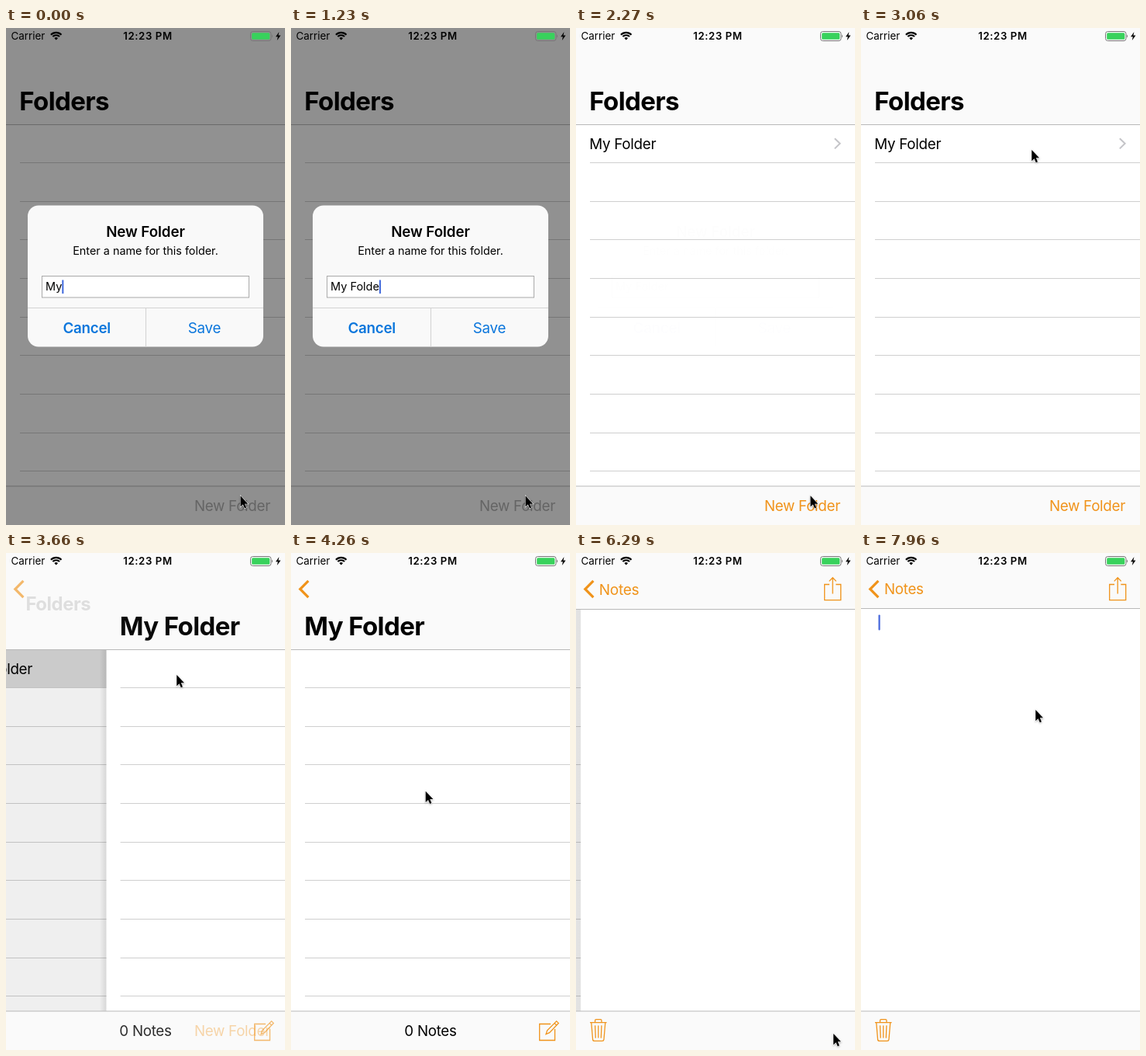
Recreate the animation shown at these times as an HTML page. Size 360 by 640 pixels, loop 7.99 s.

```html
<!DOCTYPE html>
<html lang="en">
<head>
<meta charset="utf-8">
<title>Folders</title>
<style>
html, body { margin: 0; width: 100%; height: 100%; overflow: hidden; background: #fff; }
svg { display: block; width: 360px; height: 640px; font-family: Inter, "Liberation Sans", sans-serif; }
text { white-space: pre; }
.body { font-size: 18.8px; letter-spacing: -.3px; }
.large { font-size: 33px; font-weight: 700; letter-spacing: -.6px; }
.semi { font-weight: 600; }
.mid { text-anchor: middle; }
.tint { fill: #f0931a; }
.icon { fill: none; stroke: #f0931a; stroke-width: 1.3; }
.hair { stroke: #b9b9b9; }
</style>
</head>
<body>
<svg viewBox="0 0 360 640">
  <defs>
    <linearGradient id="shade">
      <stop offset="0" stop-color="#000" stop-opacity="0"/>
      <stop offset="1" stop-color="#000" stop-opacity=".28"/>
    </linearGradient>
    <path id="lines" fill="none" stroke="#cfcfcf"/>
    <rect id="edge" x="-9" width="9" height="640" fill="url(#shade)"/>
  </defs>

  <rect width="360" height="640" fill="#fff"/>
  <g id="folders">
    <g id="row">
      <rect id="press" y="124" width="360" height="50" fill="#d9d9d9"/>
      <text class="body" x="17.3" y="156">My Folder</text>
      <path d="M333.8 142.2L340.6 148.8L333.8 155.4" fill="none" stroke="#c4c4c8" stroke-width="2"/>
    </g>
    <use href="#lines"/>
  </g>
  <rect id="shade1" width="360" height="640"/>
  <g id="notes">
    <use id="edge1" href="#edge"/>
    <rect width="360" height="640" fill="#fff"/>
    <use href="#lines"/>
  </g>
  <rect id="shade2" width="360" height="640"/>
  <g id="note">
    <use id="edge2" href="#edge"/>
    <rect width="360" height="640" fill="#fff"/>
    <rect id="noteCaret" x="22.5" y="79.5" width="2.2" height="20" rx="1" fill="#4566dc"/>
  </g>

  <rect id="nav" width="360" fill="#fafafa"/>
  <path id="navLine" class="hair" d="M0 0H360"/>
  <rect y="590" width="360" height="50" fill="#fafafa"/>
  <path class="hair" d="M0 590H360"/>

  <text id="title1" class="large">Folders</text>
  <text id="title2" class="large">My Folder</text>
  <path id="back" class="icon" style="stroke-width:3.2" d="M22.4 35.8L11.8 46.5L22.4 57.2"/>
  <text id="backLabel" class="body tint">Notes</text>
  <path id="share" class="icon" d="M327 40.5H320.7V60.7H341.7V40.5H335.3M331.2 52.5V32M326.7 36.4L331.2 31.8L335.7 36.4"/>

  <text id="add" class="body" x="341" y="622" text-anchor="end">New Folder</text>
  <text id="count" class="body mid" x="180" y="622">0 Notes</text>
  <path id="compose" class="icon" d="M335 606.5H320.7V627.5H340.5V613M329 619.6L330.6 614.8L342.6 602.8L345.2 605.4L333.6 617.6ZM340 605.4L342.8 608.2"/>
  <path id="trash" class="icon" d="M18 604.6H39.6M24.6 604.4V602Q24.6 600.6 26 600.6H31.6Q33 600.6 33 602V604.4M19.8 604.8L21.6 626.4Q21.8 628.4 23.8 628.4H33.8Q35.8 628.4 36 626.4L37.8 604.8M24.6 608.4L25.3 624.6M28.8 608.4V624.6M33 608.4L32.3 624.6"/>

  <rect id="dim" width="360" height="640"/>
  <g id="alert">
    <rect x="28" y="228.5" width="304" height="182" rx="14" fill="#f9f9f9"/>
    <text class="body semi mid" x="180" y="269" style="letter-spacing:-.1px">New Folder</text>
    <text class="mid" x="180" y="291.5" font-size="14.4">Enter a name for this folder.</text>
    <rect id="field" x="46.5" y="319.5" width="267" height="27.5" fill="#fff"/>
    <text id="typed" x="51" y="338.3" font-size="14.5"></text>
    <rect id="caret" y="324.5" width="2" height="17.5" fill="#3f68dc"/>
    <path d="M28 360.5H332M180.5 361V410.5" stroke="#d2d2d2"/>
    <text class="body semi mid" x="104.2" y="392.8" fill="#0b76dc">Cancel</text>
    <text class="body mid" x="256" y="392.8" fill="#0b76dc">Save</text>
  </g>

  <g id="status">
    <text x="6.5" y="15.3" font-size="13.4">Carrier</text>
    <path d="M57.9 8.7A9.6 9.6 0 0 1 71.5 8.7M60.3 11.1A6.2 6.2 0 0 1 69.1 11.1" fill="none" stroke="#000" stroke-width="2.1"/>
    <path d="M62.3 13.1A3.4 3.4 0 0 1 67.1 13.1L64.7 15.6Z"/>
    <text class="semi mid" x="183" y="15.3" font-size="13.2" letter-spacing=".6">12:23 PM</text>
    <rect x="315.5" y="4.5" width="26.5" height="12" rx="3" fill="none" stroke="#777"/>
    <rect x="317.2" y="6.2" width="23.1" height="8.6" rx="1.6" fill="#38d25c"/>
    <path d="M343 8.5Q345 10.5 343 12.5Z" fill="#777"/>
    <path d="M352.4 5L348 11.2H350.8L349.8 16L354.4 9.6H351.4Z"/>
  </g>
  <path id="cursor" d="M0 0V16.4L3.8 12.9L6.3 18.6L8.8 17.5L6.4 11.9H11.2Z" stroke="#fff" stroke-width="1.2" paint-order="stroke" style="filter:drop-shadow(0 1px 1px rgba(0,0,0,.3))"/>
</svg>

<script>
const LOOP = 7990;
const ui = {};
document.querySelectorAll('[id]').forEach(n => ui[n.id] = n);

const clamp = v => Math.max(0, Math.min(1, v));
const mix = (a, b, p) => a + (b - a) * p;
const set = (n, name, v) => n.setAttribute(name, v);
const fade = (n, v) => set(n, 'opacity', clamp(v));
const place = (n, x, y = 0, s = 1) => set(n, 'transform', `translate(${x} ${y}) scale(${s})`);

// critically damped spring used by every transition
const spring = (t, start) => {
  const k = Math.max(0, t - start) * 0.018;
  return k > 9 ? 1 : 1 - (1 + k) * Math.exp(-k);
};

const DISMISS = 1814, ROW = 2250, TAP = 3460, OPEN = 3540;
const COMPOSE = 5890, WRITE = 5957, FOCUS = 7430;
const NAME = 'My Folder';
const KEYS = [200, 600, 760, 920, 1080, 1220, 1380];
const PATH = [
  [2450, 302.5, 602.3], [2900, 222, 160], [3060, 220.3, 157],
  [3920, 220.3, 157], [4160, 157, 268], [4235, 157, 268],
  [4260, 173.7, 306.7], [4480, 272, 520], [4750, 321, 614],
  [5030, 321, 614], [5300, 320, 607], [5610, 332.2, 619],
  [6400, 332.2, 619], [6660, 300, 288], [7050, 228, 206], [7300, 225.3, 202]
];

set(ui.lines, 'd', Array.from({ length: 9 }, (_, i) =>
  `M18 ${173.5 + Math.round(i * 49.65)}H360`).join(''));

function pointer(t) {
  const i = PATH.findIndex(k => k[0] > t);
  if (i === 0) return PATH[0].slice(1);
  if (i < 0) return PATH[PATH.length - 1].slice(1);
  const [t0, x0, y0] = PATH[i - 1], [t1, x1, y1] = PATH[i];
  const u = (t - t0) / (t1 - t0), e = u * u * (3 - 2 * u);
  return [mix(x0, x1, e), mix(y0, y1, e)];
}

// a large title shrinking into the back button
function shrink(n, p) {
  place(n, mix(17.2, 30, p), mix(106, 53, Math.pow(p, 1.1)), mix(1, 0.57, p));
  fade(n, 1 - p * 1.4);
}

// a pushed panel casts its shadow only while it is moving
const castShadow = (n, p) => fade(n, p > 0 ? 1 - p : 0);

function drawAlert(t) {
  const left = 1 - spring(t, DISMISS), closing = t >= DISMISS;
  for (const part of ui.alert.children) fade(part, left);
  fade(ui.dim, left * 0.43);
  ui.typed.textContent = NAME.slice(0, 2 + KEYS.filter(k => t >= k).length);
  set(ui.caret, 'x', 51 + ui.typed.getComputedTextLength());
  fade(ui.caret, closing ? 0 : 1);
  set(ui.field, 'stroke', closing ? '#111' : '#a9a9a9');
  set(ui.add, 'fill', closing ? '#f0931a' : '#b0b0b0');
}

function render(t) {
  const p = spring(t, OPEN), q = spring(t, WRITE);
  drawAlert(t);

  fade(ui.row, t >= ROW ? 1 : 0);
  fade(ui.press, t >= TAP ? 1 : 0);
  place(ui.folders, -108 * p);
  fade(ui.shade1, p * 0.1);
  place(ui.notes, 360 * (1 - p) - 108 * q);
  castShadow(ui.edge1, p);
  fade(ui.shade2, q * 0.11);
  place(ui.note, 360 * (1 - q));
  castShadow(ui.edge2, q);
  fade(ui.noteCaret, t >= FOCUS ? 1 : 0);

  const bottom = 124.5 - 53 * Math.pow(q, 1.1);
  set(ui.nav, 'height', bottom);
  place(ui.navLine, 0, bottom);
  shrink(ui.title1, p);
  if (q > 0) shrink(ui.title2, q);
  else {
    place(ui.title2, 17.2 + 360 * (1 - p), 106);
    fade(ui.title2, p * 1.5);
  }
  fade(ui.back, p);
  place(ui.backLabel, mix(18, 30, q), mix(106, 53, q), mix(1.7, 1, q));
  fade(ui.backLabel, (q - 0.35) / 0.6);
  fade(ui.share, q * 1.1);

  fade(ui.add, 1 - p);
  fade(ui.count, p * (1 - (q - 0.14) * 2));
  fade(ui.compose, p * (t >= COMPOSE ? 0.33 : 1) * (1 - q));
  fade(ui.trash, q);
  place(ui.cursor, ...pointer(t), 0.87);
}

const begin = performance.now();
function tick() {
  render((performance.now() - begin) % LOOP);
  requestAnimationFrame(tick);
}
tick();
</script>
</body>
</html>
```
